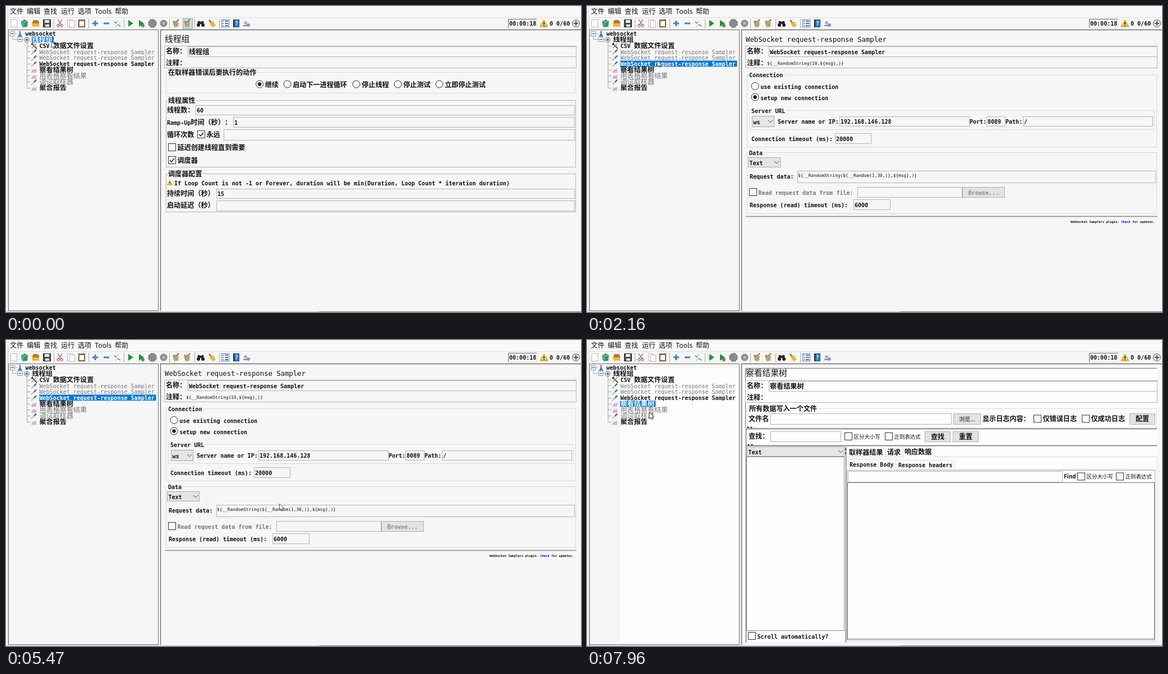
An HTML page that plays this animation: 1025x546 px, repeating every 8 s.

```html
<!DOCTYPE html>
<html lang="zh-CN">
<head>
<meta charset="utf-8">
<style>
html, body { margin: 0; width: 100%; height: 100%; overflow: hidden; background: #f6f6f6; }
svg { display: block; }
text { font-family: 'Noto Sans CJK SC', 'Noto Sans', sans-serif; white-space: pre; text-spacing-trim: space-all; }
.mono { font-family: 'DejaVu Sans Mono', 'Liberation Mono', monospace; }
</style>
</head>
<body>
<svg id="stage" width="100%" height="100%" viewBox="0 0 1025 546"></svg>
<script>
const LOOP = 8000;
const INK = '#111', GREY = '#777', EDGE = '#b4b4b4', PALE = '#dadada', DARK = '#6e6e6e', BG = '#f6f6f6', WHITE = '#fdfdfd';
let fields = [], paper = BG;

// Text is placed by left edge and vertical centre; Latin letters are half as wide as Chinese ones.
const LATIN = .5 / .602;
const latinRuns = (s, size) => s.replace(/[ -~]+/g, run => `<tspan class="mono" font-size="${size * LATIN}">${run}</tspan>`);
const text = (x, cy, s, { size = 12.1, color = INK, weight = 700, ui = false, anchor = 'start' } = {}) =>
  `<text x="${x}" y="${cy + size * .36}" font-size="${size}" fill="${color}" font-weight="${weight}" text-anchor="${anchor}">${ui ? s : latinRuns(s, size)}</text>`;
const textWidth = s => [...s].reduce((w, c) => w + (c > '~' ? 12.1 : 6.05), 0);
const area = (x, y, x2, y2, fill) => `<rect x="${x}" y="${y}" width="${x2 - x}" height="${y2 - y}" fill="${fill}"/>`;
const box = (x, y, x2, y2, stroke = EDGE, fill = 'none') =>
  `<rect x="${x + .5}" y="${y + .5}" width="${x2 - x - 1}" height="${y2 - y - 1}" fill="${fill}" stroke="${stroke}"/>`;
const path = (d, stroke = INK, width = 1, fill = 'none') =>
  `<path d="${d}" stroke="${stroke}" stroke-width="${width}" fill="${fill}"/>`;
const shape = (d, fill) => path(d, 'none', 0, fill);
const dot = (x, y, r, fill, stroke = 'none') => `<circle cx="${x}" cy="${y}" r="${r}" fill="${fill}" stroke="${stroke}"/>`;
const at = (x, y, s) => `<g transform="translate(${x} ${y})">${s}</g>`;

const SMALL = { size: 9.45, weight: 400 };
const field = (x, y, x2, y2, value = '') => {
  fields.push([x, y, x2, y2]);
  return box(x, y, x2, y2) + text(x + 2, (y + y2) / 2, value);
};
const group = (label, y, y2, stroke = EDGE, x = 285, x2 = 1016) =>
  box(x, y, x2, y2, stroke) + area(x + 3, y - 2, x + 6 + textWidth(label), y + 3, paper) + text(x + 4, y + .5, label);
const radio = (x, y, label, on) =>
  dot(x, y, 6.5, '#fafafa', '#333') + (on ? dot(x, y, 3.3, '#222') : '') + text(x + 9.7, y + .7, label);
const check = (x, cy, label, on, style) =>
  box(x, cy - 7, x + 14, cy + 7, '#333', '#fafafa') +
  (on ? path(`M${x + 3} ${cy}l3 3 5-6`, INK, 1.3) : '') + text(x + 16.5, cy + .5, label, style);
const button = (x, y, x2, y2, label, style) =>
  box(x, y, x2, y2, '#b0b0b0', '#e2e2e2') + text((x + x2) / 2, (y + y2) / 2, label, { anchor: 'middle', ...style });
const combo = (x, y, x2, y2, label) =>
  box(x, y, x2, y2, '#aaa', '#e5e5e5') + text(x + 2.5, (y + y2) / 2 + .5, label) +
  path(`M${x2 - 11} ${(y + y2) / 2 - 2}l4 4 4-4`, '#444');
const warning = (x, y, s) =>
  at(x, y, `<g transform="scale(${s})">${path('M0-6L7 6H-7Z', '#a87510', .8, '#ffc928') + path('M0-2v4M0 3.5v1.5', INK, 1.6)}</g>`);

// Icons, each centred on the origin.
const page = box(-5, -6, 5, 7, '#b9b9b9', '#fff');
const brush = shape('M-6-2L-1-5 5-2 4 6-3 7Z', '#c4aa7d') + path('M1-3L5-7', '#8a6a48', 2) + path('M-3 0v5M1 0v5', '#97805a');
const play = shape('M-4-6L5 0-4 6Z', '#159a28');
const dropper = path('M-5 5L1-1', '#a3bfae', 2) + path('M0 0L4-4', '#5d6d65', 2.6);
const report = shape('M-4 2L-1-2 1 0 4-3 4 3H-4Z', '#eaa3d0') + path('M-5 4H4', '#a9aadb', 1.4);
const tool = path('M-4-4L5 5', '#333', 1.8) + path('M4-4L-4 4', '#c69a32', 1.8) + path('M-5-2l3-3', '#333', 2);
const flask = shape('M-1-5H1V0L4 5H-4L-1 0Z', '#3b78b5');
const gear = dot(0, 0, 4.3, '#dce6ef', '#55718b') + dot(0, 0, 1.8, '#38536d');

const toolbarIcons = [
  [14, box(-6, -7, 6, 7, '#c8b89d', '#fff')],
  [33, shape('M-6-4L0-7 6-4 5 6-3 7-5 4Z', '#2e9a58') + shape('M-6-3L-1-1V7L-5 4Z', '#4f9ed0') + path('M-4-5l4 3 5-3', '#e6e6a0')],
  [53, shape('M-4-6H3L6-3V6H-6V-2Z', '#b9791f') + shape('M-7 0H5L7 6H-6Z', '#f3b63c')],
  [73, box(-7, -7, 7, 7, '#222', '#4b4f55') + shape('M-4-6H4V-1H-4ZM-3 2H4V6H-3Z', '#eee')],
  [96, path('M-4-7L3 3M4-7L-3 3', '#999', 1.8) + dot(-3, 4, 2.2, 'none', '#d12626') + dot(3, 4, 2.2, 'none', '#d12626')],
  [116, at(-2, -1, page) + at(2, 1, page)],
  [135, box(-6, -7, 6, 7, '#754b20', '#ad702f') + shape('M-4-4H4V5H-4Z', '#fff') + shape('M-3-7H3V-4H-3Z', '#777')],
  [159, path('M-5 0H5M0-5V5', '#3d85c0', 3)],
  [179, path('M-5 0H5', '#3d85c0', 3)],
  [198, path('M-5-3l4 3M1 2l5 3', '#5b9a68', 2) + path('M2-5l-3 3M0 3l-3 3', '#a9c9e0', 1.5)],
  [222, play],
  [241, play + dot(3, 4, 3, '#6f7b72')],
  [261, path('M-3-7H3L7-3V3L3 7H-3L-7 3V-3Z', '#777', 1, '#8b8b8b')],
  [281, dot(0, 0, 6, '#919191', '#7b7b7b') + path('M-2-2L2 2M2-2L-2 2', '#ccc', 1.4)],
  [303, brush + path('M-5-4l4 3', '#63a36a', 3)],
  [323, brush + path('M-5-4l4 3', '#a68b62', 3)],
  [347, path('M-3-4L-4 3M3-4L4 3M-2-1H2', '#30251f', 4) + dot(-4, 3, 3, '#201d1c') + dot(4, 3, 3, '#201d1c')],
  [367, path('M-5-6L0 0', '#8b5a2b', 2) + shape('M-4 0L2-4 7 4 1 7Z', '#f0b52b')],
  [391, box(-7, -7, 7, 7, '#5878b8', '#fff') + path('M-5-4h2M-5 0h2M-5 4h2', '#38a360', 2) + path('M-1-4h6M-1 0h6M-1 4h6', '#4a68bb', 2)],
  [410, box(-5, -7, 6, 7, '#174f87', '#2f7dc1') + path('M-4-7V7', '#222', 2) + text(1, 0, '?', { size: 9, color: '#fff', anchor: 'middle', ui: true })],
  [429, dot(-2, -1, 3, '#a8b0cc') + dot(3, 3, 3, '#8299c8') + path('M-6 4h8', '#7b81a1', 2)]
];

const frame = () => {
  const menu = [[7, '文件'], [37, '编辑'], [67, '查找'], [98, '运行'], [128, '选项'], [158, 'Tools'], [194, '帮助']];
  return area(0, 0, 1025, 546, BG) + area(0, 0, 1025, 20, '#f9f9f9') +
    path('M3.5 0V546', '#d4d4d4') + path('M4 20.5H1025', '#dedede') +
    menu.map(([x, s]) => text(x, 10, s, { ui: true, weight: 500 })).join('') +
    [85, 147, 210, 291, 336, 380].map(x => path(`M${x}.5 23V40`, '#aaa')).join('') +
    `<g id="hover">${box(315, 22, 333, 41, '#7ca4c4', '#c6dcec')}</g>` +
    toolbarIcons.map(([x, icon]) => at(x, 31, icon)).join('') +
    path('M895.5 39V23.5H946', '#666') + path('M896 39.5H946.5V24', '#e0e0e0') +
    text(897, 31, '00:00:18') + warning(959, 31, 1) + text(969, 31, '0 0/60') +
    dot(1016, 31, 6.5, '#e6e6e6', '#555') + path('M1012 31h8M1016 27v8', '#555', 2) +
    box(4, 42, 272, 544, DARK) +
    path('M275.5 544V42.5H1025', DARK, 1.4) + path('M0 545.5H558', '#c4c4c4') + path('M558 545.5H1025', '#777');
};

const SAMPLER = 'WebSocket request-response Sampler';
const rows = [
  ['websocket', 34, flask], ['线程组', 46, gear], ['CSV 数据文件设置', 59, tool],
  [SAMPLER, 59, dropper, true], [SAMPLER, 59, dropper, true], [SAMPLER, 59, dropper],
  ['察看结果树', 59, report], ['用表格察看结果', 59, report, true], ['调试取样器', 59, dropper, true], ['聚合报告', 59, report]
];
const expander = (x, y) => box(x - 4, y - 4, x + 5, y + 5, '#8a9bab', '#fff') + path(`M${x - 2} ${y + .5}h5`, '#234');
const tree = selected => {
  let out = path('M11.5 54V59.5H20M15 49.5h5M28 60h4M37.5 65V146', '#a5a5a5') + expander(11, 49) + expander(24, 59);
  rows.forEach(([label, x, icon, disabled], i) => {
    const y = 49 + i * 10.77, on = i === selected;
    if (i > 1) out += path(`M37 ${Math.round(y) + .5}H44`, '#a5a5a5');
    out += at(x === 59 ? 50 : x - 9, y + .5, icon);
    out += `<svg x="${x}" y="${y - 5.6}" width="${textWidth(label) + 3}" height="11.2">` +
      (on ? '<rect width="100%" height="100%" fill="#0078d7"/>' : '') +
      text(.5, 5.6, label, { color: on ? '#fff' : disabled ? GREY : INK, weight: disabled ? 500 : 700 }) + '</svg>';
  });
  return out;
};

const header = (title, dy = 0, comment = '') =>
  text(283, 59, title, { size: 14.75, weight: 500 }) + box(282, 71 + dy, 1017, 111 + dy) +
  text(285, 81 + dy, '名称：') + field(324, 72 + dy, 1017, 91 + dy, title) +
  text(285, 102 + dy, '注释：') + text(321, 102, comment, SMALL);

const threadPanel = () => header('线程组') +
  group('在取样器错误后要执行的动作', 118, 156, PALE) +
  [[452, '继续'], [501.5, '启动下一进程循环'], [624.5, '停止线程'], [698.5, '停止测试'], [772.5, '立即停止测试']]
    .map(([x, s], i) => radio(x, 139.5, s, !i)).join('') +
  group('线程属性', 168, 288) +
  text(287, 186, '线程数：') + field(338, 177, 1014, 195, '60') +
  text(287, 208, 'Ramp-Up时间（秒）：') + field(405, 198, 1014, 217, '1') +
  text(287, 230, '循环次数') + check(341, 229, '永远', true) + field(388, 220, 1014, 240) +
  check(289, 252, '延迟创建线程直到需要') + check(289, 275, '调度器', true) +
  group('调度器配置', 299, 368) + warning(292, 315, .7) +
  text(300, 315.5, 'If Loop Count is not -1 or Forever, duration will be min(Duration, Loop Count * iteration duration)') +
  text(287, 335, '持续时间（秒）') + field(375, 326, 1014, 344, '15') +
  text(287, 356, '启动延迟（秒）') + field(375, 347, 1014, 366) +
  `<g id="threadCaret">${path('M353.5 179V193')}</g>`;

const samplerPanel = () => header(SAMPLER, 0, '${__RandomString(10,${msg},)}') +
  group('Connection', 122, 252, PALE) +
  radio(299.5, 143, 'use existing connection') + radio(299.5, 162.5, 'setup new connection', true) +
  group('Server URL', 186, 221, PALE, 289, 1012) +
  combo(294, 196, 334, 216, 'ws') + text(340, 206, 'Server name or IP:') +
  field(450, 197, 682, 215, '192.168.146.128') + text(682, 206, 'Port:') +
  field(712, 197, 746, 215, '8089') + text(746, 206, 'Path:') + field(777, 197, 1009, 215, '/') +
  text(293, 237, 'Connection timeout (ms):') + field(442, 227, 507, 246, '20000') +
  group('Data', 261, 371, PALE) + combo(287, 270, 345, 288, 'Text') +
  text(290, 304, 'Request data:') + field(375, 294, 1014, 316) +
  text(376, 302, '${__RandomString(${__Random(1,30,)},${msg},)}', SMALL) +
  check(289, 332, 'Read request data from file:', false, { color: GREY }) + field(482, 323, 669, 342) +
  button(669, 323, 745, 342, 'Browse...', { color: '#8a8a8a' }) +
  text(290, 355, 'Response (read) timeout (ms):') + field(475, 345, 541, 364, '6000') +
  path('M283 375.5H1017', '#8a8a8a', 1.3) +
  text(862, 384.5, 'WebSocket Samplers plugin. Check for updates.', { size: 6.7 }).replace('Check', '<tspan fill="#00f">Check</tspan>') +
  `<g id="requestCaret">${path('M588.5 296V309')}</g>`;

const resultsPanel = () => {
  const arrows = (x, y) => shape(`M${x} ${y + 1}l2-3 2 3ZM${x + 6} ${y - 1}l2 3 2-3Z`, INK);
  const options = (x, x2, y) => check(x, y, '区分大小写', false, SMALL) + check(x2, y, '正则表达式', false, SMALL);
  return path('M282.5 157V50.5H1016', DARK) + header('察看结果树', 1) +
    group('所有数据写入一个文件', 122, 157, PALE) +
    text(288, 141, '文件名') + field(327, 131, 650, 151) +
    button(653, 131, 702, 151, '浏览...', { size: 10, weight: 400, ui: true }) +
    text(705, 141, '显示日志内容：') + check(796, 140.5, '仅错误日志') + check(882, 140.5, '仅成功日志') +
    button(967, 131, 1013, 151, '配置') +
    arrows(285, 156) + path('M283 158.5H1016M283.5 158V187', DARK, 1.3) +
    text(288, 172, '查找：') + field(327, 163, 453, 182) + options(459, 531, 172) +
    button(602, 163, 648, 182, '查找') + button(652, 163, 698, 182, '重置') +
    arrows(286, 187) + path('M283 188.5H1016M283.5 188V540M461.5 190V540', DARK, 1.3) +
    combo(285, 190, 459, 208, 'Text') + box(284, 208, 459, 519, '#888') + check(287, 528, 'Scroll automatically?') +
    shape('M459 195l3-2v4ZM459 202l3-2v4Z', INK) +
    path('M463 208.5H563.5V190.5H618.5V208.5H1016V538.5H462', PALE) + path('M532.5 193V208', PALE) +
    text(467, 201, '取样器结果') + text(535, 201, '请求') + text(566, 199.5, '响应数据') +
    path('M463.5 231V212.5H550.5V230.5H1012M551 214.5H654.5V230', PALE) +
    text(468, 221.5, 'Response Body') + text(555, 222.5, 'Response headers') +
    box(463, 232, 1013, 536, '#aaa') + field(465, 234, 848, 254) +
    text(850, 243.5, 'Find', { size: 10, ui: true }) + options(874, 943, 243.5) +
    box(464, 254, 1012, 534, '#777');
};

const scenes = [
  [0, 1, BG, threadPanel], [2160, 5, BG, samplerPanel], [7530, 6, WHITE, resultsPanel]
].map(([start, row, color, panel]) => {
  fields = [];
  paper = color;
  const ground = area(59, 50, 271, 539, paper) + area(278, 50, 1018, 539, paper);
  return { start, markup: ground + tree(row) + panel(), fields };
});

const stage = document.getElementById('stage');
stage.innerHTML = frame() + scenes.map((s, i) => `<g id="scene${i}">${s.markup}</g>`).join('') +
  `<g id="arrow">${path('M0 0V11.5L2.8 9 4.6 13 6.4 12.2 4.7 8.4H8.3Z', '#222', .8, '#fff')}</g>` +
  `<g id="beam">${path('M-3-5.5H-1L0-4.5 1-5.5H3M0-4.5V4.5M-3 5.5H-1L0 4.5 1 5.5H3')}</g>`;
const el = id => document.getElementById(id);
const show = (id, on) => el(id).setAttribute('display', on ? 'inline' : 'none');

// Pointer moves: first step, last step, number of steps, way points.
const moves = [
  [140, 920, 7, [[95, 72], [230, 140], [355, 196], [377, 188]]],
  [1200, 1880, 6, [[372, 200], [344, 267], [230, 190], [125, 97]]],
  [2160, 3160, 8, [[125, 97], [150, 132], [345, 200], [560, 228], [582, 208]]],
  [3310, 4270, 8, [[600, 207], [700, 208], [803, 206]]],
  [4420, 5320, 8, [[790, 212], [738, 280], [640, 240], [606, 207]]],
  [5470, 6280, 7, [[487.5, 292], [600, 306], [728, 312], [560, 316], [614, 302]]],
  [6560, 7250, 6, [[590, 290], [350, 190], [99, 116]]],
  [7960, 7960, 1, [[111, 129]]]
];
const along = (points, u) => {
  const p = u * (points.length - 1), i = Math.floor(p), a = points[i], b = points[i + 1] || a;
  return a.map((v, k) => v + (b[k] - v) * (p - i));
};
const pointer = t => {
  const move = moves.filter(m => m[0] <= t).pop();
  if (!move) return [81, 63];
  const [start, end, steps, points] = move;
  if (t >= end) return points[points.length - 1];
  const step = Math.floor((t - start) / (end - start) * (steps - 1) + 1e-6);
  return along(points, step / (steps - 1));
};

function render(now) {
  const t = now % LOOP;
  const scene = scenes.filter(s => s.start <= t).pop();
  scenes.forEach((s, i) => show('scene' + i, s === scene));
  show('hover', t < 140);
  show('threadCaret', t >= 920);
  show('requestCaret', t >= 6280);
  const [x, y] = pointer(t);
  const overField = scene.fields.some(([l, top, r, b]) => x > l && x < r && y > top && y < b);
  for (const [id, on] of [['arrow', !overField], ['beam', overField]]) {
    show(id, on);
    el(id).setAttribute('transform', `translate(${x} ${y})`);
  }
}
const begin = performance.now();
const tick = () => { render(performance.now() - begin); requestAnimationFrame(tick); };
tick();
</script>
</body>
</html>
```
